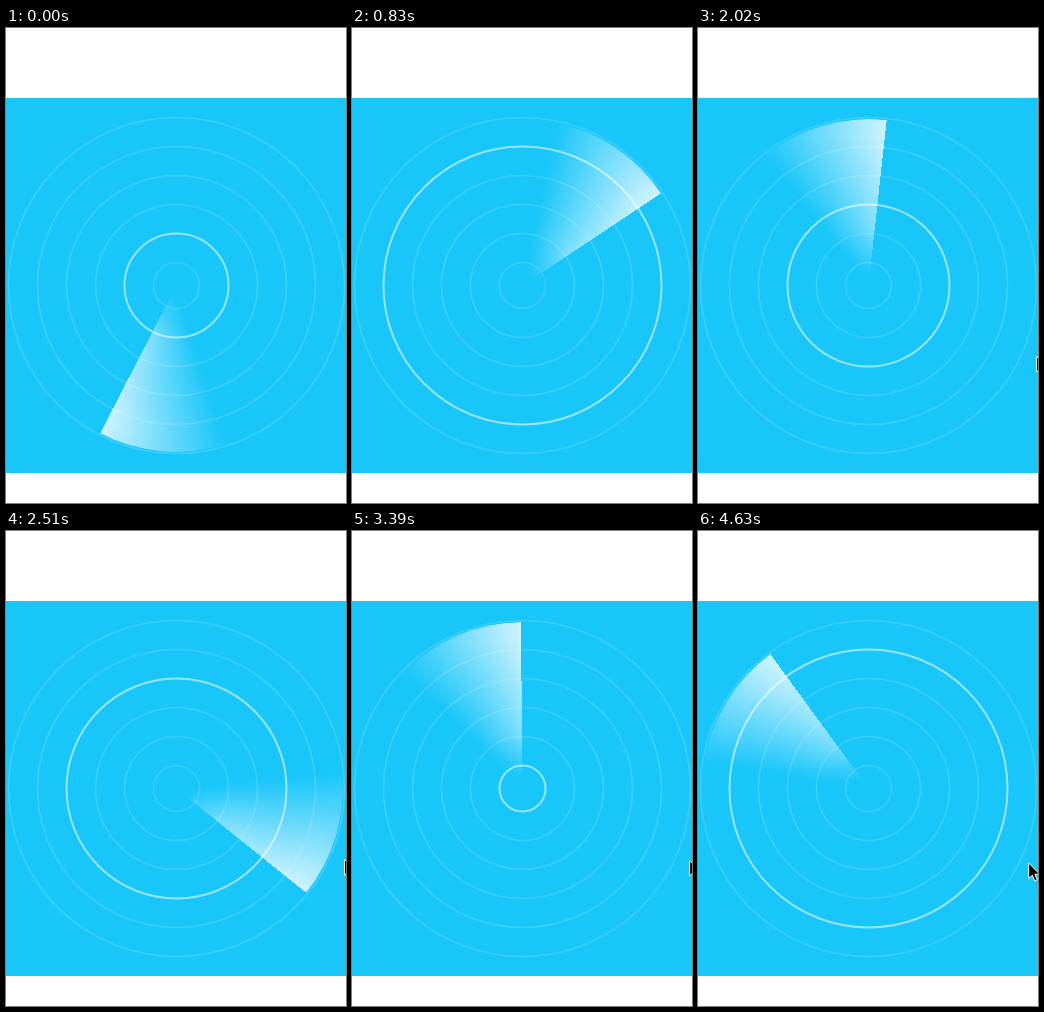
Animation of 340 by 475 pixels, one loop 4.73 s. Source, as an HTML page:

```html
<!DOCTYPE html>
<html lang="en">
<head>
<meta charset="utf-8">
<title>Radar</title>
<style>
  html, body { margin: 0; width: 100%; height: 100%; overflow: hidden; background: #fff; }
  #stage { position: relative; width: 340px; height: 475px; overflow: hidden; }
  #panel { position: absolute; top: 70px; width: 340px; height: 375px; background: #18c6fa; }
  #sweep {
    position: absolute; left: 4px; top: 91px; width: 333px; height: 333px; border-radius: 50%;
    background: conic-gradient(#fff0 315deg, #ffffffc8 360deg);
    -webkit-mask: radial-gradient(circle closest-side, #0000 6%, #0009 35%, #000 90%);
    mask: radial-gradient(circle closest-side, #0000 6%, #0009 35%, #000 90%);
  }
  svg { position: absolute; left: 0; top: 0; }
  circle { fill: none; stroke: #fff; stroke-width: 1.7; stroke-opacity: .15; }
  circle.lit { stroke-width: 2; stroke-opacity: .55; }
</style>
</head>
<body>
<div id="stage">
  <div id="panel"></div>
  <div id="sweep"></div>
  <svg id="overlay" width="340" height="475">
    <g id="rings"></g>
    <path id="cursor" d="M0 0V15.5L3.6 12.2 6 17.8 8.6 16.7 6.2 11.2H11Z" fill="#000" stroke="#fff"/>
  </svg>
</div>
<script>
const LOOP = 4730, TICK = 27.89, LAST_STEP = 166, RING_COUNT = 6;
const sweep = document.getElementById('sweep');
const cursor = document.getElementById('cursor');
const ringGroup = document.getElementById('rings');

const rings = Array.from({ length: RING_COUNT }, (_, i) => {
  const ring = document.createElementNS('http://www.w3.org/2000/svg', 'circle');
  ring.setAttribute('cx', 170.5);
  ring.setAttribute('cy', 257.5);
  ring.setAttribute('r', 23 + 29 * i);
  return ringGroup.appendChild(ring);
});

// Pointer tip: time, x, y
const pointerPath = [
  [0, 342, 328], [1100, 341, 328], [1540, 339, 328.5], [2170, 338.5, 328.5],
  [2700, 338.5, 328.5], [3390, 337.5, 329.5], [3950, 334.5, 331], [4630, 330.7, 332]
];

function pointerAt(time) {
  const next = pointerPath.findIndex(p => p[0] > time);
  if (next < 0) return pointerPath.at(-1).slice(1);
  const [t0, x0, y0] = pointerPath[next - 1], [t1, x1, y1] = pointerPath[next];
  const k = (time - t0) / (t1 - t0);
  return [x0 + (x1 - x0) * k, y0 + (y1 - y0) * k];
}

function draw(now) {
  const time = Math.floor(now % LOOP / 10) * 10;
  const step = Math.min(LAST_STEP, Math.floor(time / TICK));
  sweep.style.transform = `rotate(${207.3 + 7.208 * step}deg)`;

  const lit = Math.floor((step + 19) / 11) % RING_COUNT;
  rings.forEach((ring, i) => ring.classList.toggle('lit', i === lit));

  cursor.setAttribute('transform', `translate(${pointerAt(step * TICK)})`);
}

let start;
function frame(now) {
  start ??= now;
  draw(now - start);
  requestAnimationFrame(frame);
}
draw(0);
requestAnimationFrame(frame);
</script>
</body>
</html>
```
